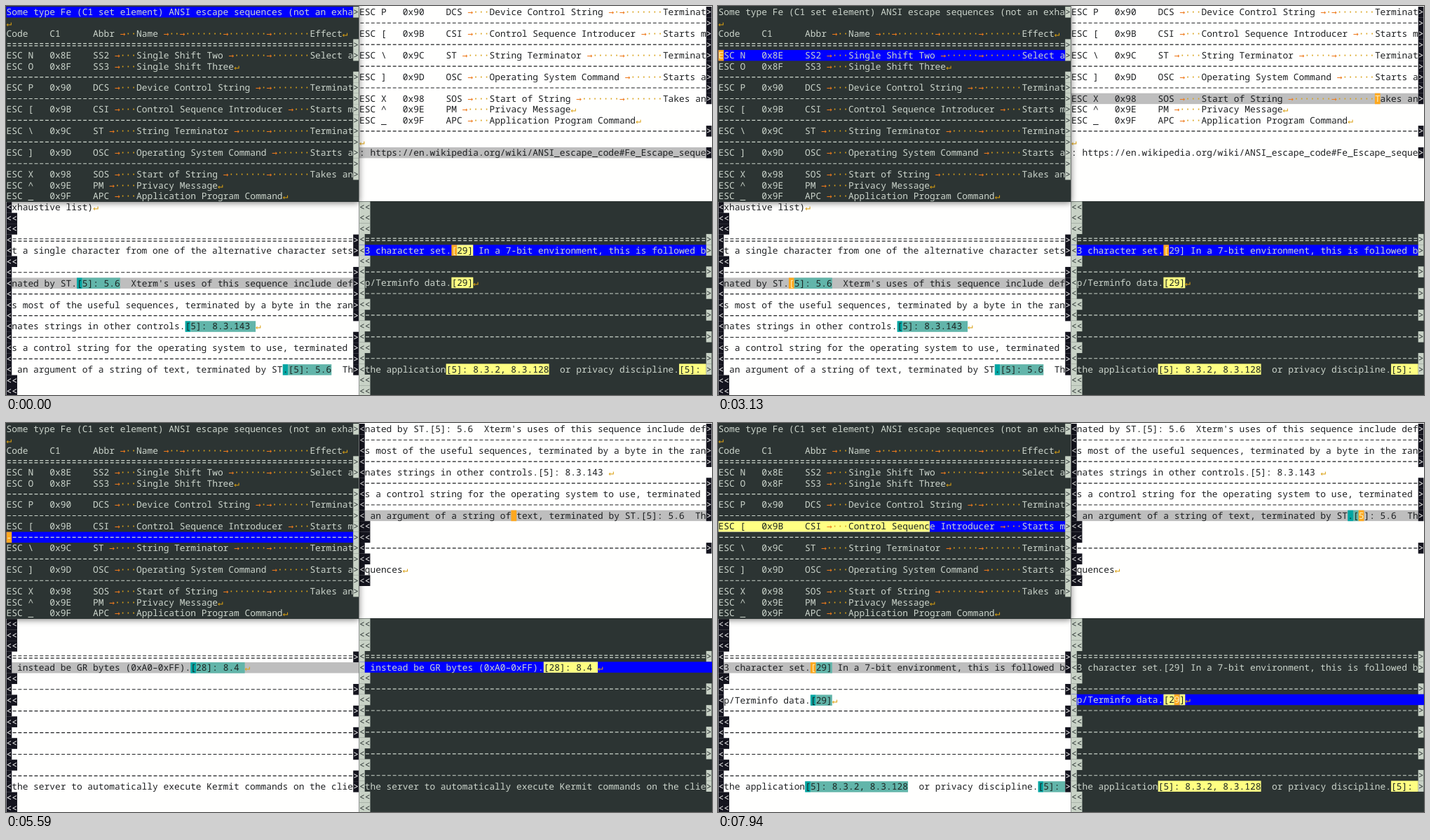
An HTML page that plays this animation: 1007x556 px, repeating every 8000 ms.

```html
<!DOCTYPE html>
<html lang="en">
<head>
<meta charset="utf-8">
<title>Four editor panes</title>
<style>
html, body { margin: 0; width: 100%; height: 100%; overflow: hidden; background: #fffffe; }
svg { display: block; width: 1007px; height: 556px; }
text {
  font: 12.883px 'Noto Sans Mono', 'DejaVu Sans Mono', monospace;
  white-space: pre; text-rendering: geometricPrecision; font-variant-ligatures: none;
}
.ctl { font: 12.84px 'DejaVu Sans Mono', monospace; }
.shade { filter: drop-shadow(0 1px 5px rgba(0, 0, 0, .55)); }
</style>
</head>
<body>
<svg id="stage" viewBox="0 0 1007 556" xmlns="http://www.w3.org/2000/svg"></svg>
<script>
const LOOP = 8000, CW = 7.73, RH = 15.46, COLS = 64;

// Turns tabs into visible arrows and dots, and braces into marked spans.
function parse(s) {
  let text = '';
  const marks = [];
  for (const ch of s) {
    if (ch === '{') marks.push([text.length]);
    else if (ch === '}') marks[marks.length - 1].push(text.length);
    else if (ch === '\t') {
      text += '→';
      while (text.length % 8) text += '·';
    } else text += ch;
  }
  return { text, marks };
}

const rule = '-'.repeat(400);
const LINES = [
  'Some type Fe (C1 set element) ANSI escape sequences (not an exhaustive list)↵',
  '↵',
  'Code    C1      Abbr \tName \t\t\t\tEffect↵',
  '='.repeat(400),
  'ESC N   0x8E    SS2 \tSingle Shift Two \t\tSelect a single character from one of the alternative character sets. SS2',
  'ESC O   0x8F    SS3 \tSingle Shift Three↵',
  rule,
  'ESC P   0x90    DCS \tDevice Control String \t\tTerminated by ST.{[5]: 5.6}  Xterm\'s uses of this sequence include defining',
  rule,
  'ESC [   0x9B    CSI \tControl Sequence Introducer \tStarts most of the useful sequences, terminated by a byte in the range',
  rule,
  'ESC \\   0x9C    ST \tString Terminator \t\tTerminates strings in other controls.{[5]: 8.3.143 }↵',
  rule,
  'ESC ]   0x9D    OSC \tOperating System Command \tStarts a control string for the operating system to use, terminated by',
  rule,
  'ESC X   0x98    SOS \tStart of String \t\tTakes an argument of a string of text, terminated by ST{.[5]: 5.6}  The',
  'ESC ^   0x9E    PM \tPrivacy Message↵',
  'ESC _   0x9F    APC \tApplication Program Command↵',
  rule,
  '↵',
  ': https://en.wikipedia.org/wiki/ANSI_escape_code#Fe_Escape_sequences↵',
  ''
].map(parse);

// What the long lines show when scrolled further right.
const MID = {
  4: parse('3 character set.{[29]} In a 7-bit environment, this is followed by'),
  7: parse('p/Terminfo data.{[29]}↵'),
  15: parse('the application{[5]: 8.3.2, 8.3.128}  or privacy discipline.{[5]: }8')
};
const END = {
  4: parse(' instead be GR bytes (0xA0–0xFF).{[28]: 8.4 }↵'),
  15: parse('the server to automatically execute Kermit commands on the client')
};
const HOME = 'home', NEXT = 'next', NEXT_AT = 60;

const DARK = { bg: '#2c3433', fg: '#ccd5cc', edge: '#c8d2c6', edgeFg: '#2c3433',
  row: '#0000ff', sel: '#ffff82', anchor: '#ffff82' };
const LIGHT = { bg: '#fffffe', fg: '#1d1f21', edge: '#14141e', edgeFg: '#fffffe',
  row: '#bebebe', sel: '#62b5aa', anchor: '#00a5a2' };
const CTL = { '→': '#ee7a1c', '·': '#d9a21a', '↵': '#dba012' };
const CURSOR = '#fda81f', CURSOR_FG = '#fff0bd', SEL_FG = '#1c2422';

const PANES = [
  { box: [504, 0, 503, 279], x: 504, y: 1, top: 7, rows: 15, look: LIGHT, state: topRight },
  { box: [0, 280, 503.5, 276], x: .5, y: 280.2, top: 0, rows: 18, look: LIGHT, state: bottomLeft },
  { box: [503.5, 279, 503.5, 277], x: 504, y: 279.5, top: 0, rows: 18, look: DARK, state: bottomRight },
  { box: [0, 0, 503.5, 280], x: .5, y: 1, top: 0, rows: 18, look: DARK, state: topLeft, raised: true }
];

// Whole steps along straight pieces between [time, value] points.
function ramp(t, ...pts) {
  if (t <= pts[0][0]) return pts[0][1];
  for (let i = 1; i < pts.length; i++) {
    const [t0, a] = pts[i - 1], [t1, b] = pts[i];
    if (t < t1) return Math.round(a + (b - a) * (t - t0) / (t1 - t0));
  }
  return pts[pts.length - 1][1];
}

const fits = line => line.text.length <= COLS;

// Moves down, then selects one line from its start.
function topLeft(t) {
  const up = t >= 6130;
  const row = up ? 9 : ramp(t, [2600, 0], [3100, 4], [3150, 4], [3900, 10]);
  const end = ramp(t, [6510, 0], [7930, 39]);
  return {
    row, col: t < 190 || t > 7900 ? -1 : end,
    view: () => HOME, marks: () => up ? [[0, end]] : []
  };
}

// Moves up, then hops along the words of one line.
const hopLine = LINES[15];
const stops = [...hopLine.text.matchAll(/\w+|·+(?=\w)/g)].map(m => m.index + m[0].length);
const anchor = hopLine.marks[0][0];
function topRight(t) {
  const row = ramp(t, [50, 13], [950, 8]);
  const hop = ramp(t, [1400, 0], [1450, 1], [1900, 1], [3100, 8], [4150, 10], [5550, 15], [6200, 19]);
  const extra = ramp(t, [7470, 0], [7900, 2]);
  const at = t < 1400 ? 0 : stops[hop] + extra;
  const col = at < COLS ? at : at - NEXT_AT;
  return {
    row, col: t < 190 ? -1 : col,
    view: line => at < COLS || (fits(line) && t < 4280) ? HOME : NEXT,
    marks: (m, line) => extra && line === hopLine ? [[anchor - NEXT_AT, col]] : []
  };
}

function bottomLeft(t) {
  const view = t < 5480 ? NEXT : t < 6660 ? END : MID;
  return {
    row: ramp(t, [5250, 7], [5450, 4]),
    col: view === NEXT && t > 200 ? ramp(t, [200, 21], [900, 23], [1880, 23], [2900, 13])
      : t > 7470 ? 17 : -1,
    view: () => view, marks: m => m
  };
}

function bottomRight(t) {
  const view = t < 3440 || t >= 7130 ? MID : END;
  const plain = view === MID && t > 1400;
  return {
    row: ramp(t, [6100, 4], [6250, 6], [7000, 6], [7100, 7]),
    col: view === END ? -1 : t < 3440 ? 17 : ramp(t, [7130, 21], [7860, 19]),
    view: () => view, marks: (m, line) => plain && line === LINES[4] ? [] : m
  };
}

// Visible text of a line and its marked columns.
function visible(n, view) {
  const line = LINES[n];
  let { text, marks } = line, from = NEXT_AT + 1;
  if (view === HOME) return { s: text.slice(0, COLS) + (fits(line) ? '' : '>'), marks };
  if (view !== NEXT && !/^[-=]{9}/.test(text)) {
    ({ text, marks } = view[n] || LINES[LINES.length - 1]);
    from = 0;
  } else if (fits(line)) text = '';
  const s = text.slice(from), room = COLS - 1;
  return {
    s: s ? '<' + s.slice(0, room) + (s.length > room ? '>' : '') : '<<',
    marks: marks.map(m => m.map(i => i - from + 1))
  };
}

const esc = s => s.replace(/&/g, '&amp;').replace(/</g, '&lt;').replace(/>/g, '&gt;');
const num = v => +v.toFixed(2);
const rect = (x, y, w, h, fill) =>
  `<rect x="${num(x)}" y="${num(y)}" width="${num(w)}" height="${num(h)}" fill="${fill}"/>`;

// Calls fn(start, end, value) for each run of equal values.
function runs(list, fn) {
  for (let a = 0, b; a < list.length; a = b) {
    for (b = a + 1; b < list.length && list[b] === list[a];) b++;
    fn(a, b, list[a]);
  }
}

const dashes = (x, y, n, color) =>
  `<path d="M${num(x + 1.4)} ${num(y)}h${num(n * CW - 2)}" stroke="${color}" ` +
  `stroke-width="1.15" stroke-dasharray="4.9 2.83"/>`;

function drawRow(p, st, r) {
  const n = p.top + r, line = LINES[n], look = p.look;
  const view = st.view(line), on = r === st.row, y = p.y + r * RH;
  const { s, marks } = visible(n, view);
  const len = Math.max(s.length, on ? st.col + 1 : 0);
  const bg = Array(len).fill(''), fg = [];
  for (let i = 0; i < len; i++) fg.push(CTL[s[i]] || look.fg);

  const shown = view === HOME ? (on ? st.marks([], line) : []) : st.marks(marks, line);
  for (const [a, b] of shown) {
    for (let i = a; i < b; i++) {
      bg[i] = i === a ? look.anchor : look.sel;
      if (!CTL[s[i]]) fg[i] = SEL_FG;
    }
  }
  const edge = i => { bg[i] = look.edge; fg[i] = look.edgeFg; };
  if (view !== HOME) edge(0);
  if (s === '<<') edge(1);
  if (s.length > COLS) edge(COLS);
  if (on && st.col >= 0) { bg[st.col] = CURSOR; fg[st.col] = CURSOR_FG; }

  let out = '';
  if (on) {
    const right = s.length > COLS ? p.x + COLS * CW : p.box[0] + p.box[2];
    out += rect(p.x, y, right - p.x, RH, look.row);
  }
  runs(bg, (a, b, c) => {
    if (c) out += rect(p.x + a * CW, y, (b - a) * CW, RH + .1, c);
  });
  runs(fg, (a, b, c) => {
    const part = s.slice(a, b), x = p.x + a * CW;
    if (!part.trim()) return;
    if (/^-{9}/.test(part)) out += dashes(x, y + 7.8, b - a, c);
    else if (/^={9}/.test(part)) out += dashes(x, y + 6.2, b - a, c) + dashes(x, y + 9.5, b - a, c);
    else {
      const cls = CTL[part[0]] ? ' class="ctl"' : '';
      out += `<text${cls} x="${num(x)}" y="${num(y + 12.2)}" fill="${c}">${esc(part)}</text>`;
    }
  });
  return out;
}

function drawPane(p, t) {
  const st = p.state(t);
  let out = '';
  for (let r = 0; r < p.rows; r++) out += drawRow(p, st, r);
  if (out !== p.last) p.body.innerHTML = p.last = out;
}

const stage = document.getElementById('stage');
stage.innerHTML = PANES.map(p =>
  `<g${p.raised ? ' class="shade"' : ''}>${rect(...p.box, p.look.bg)}</g><g class="body"></g>`).join('');
stage.querySelectorAll('.body').forEach((g, i) => { PANES[i].body = g; });

function frame() {
  const t = performance.now() % LOOP;
  for (const p of PANES) drawPane(p, t);
  requestAnimationFrame(frame);
}
frame();
</script>
</body>
</html>
```
